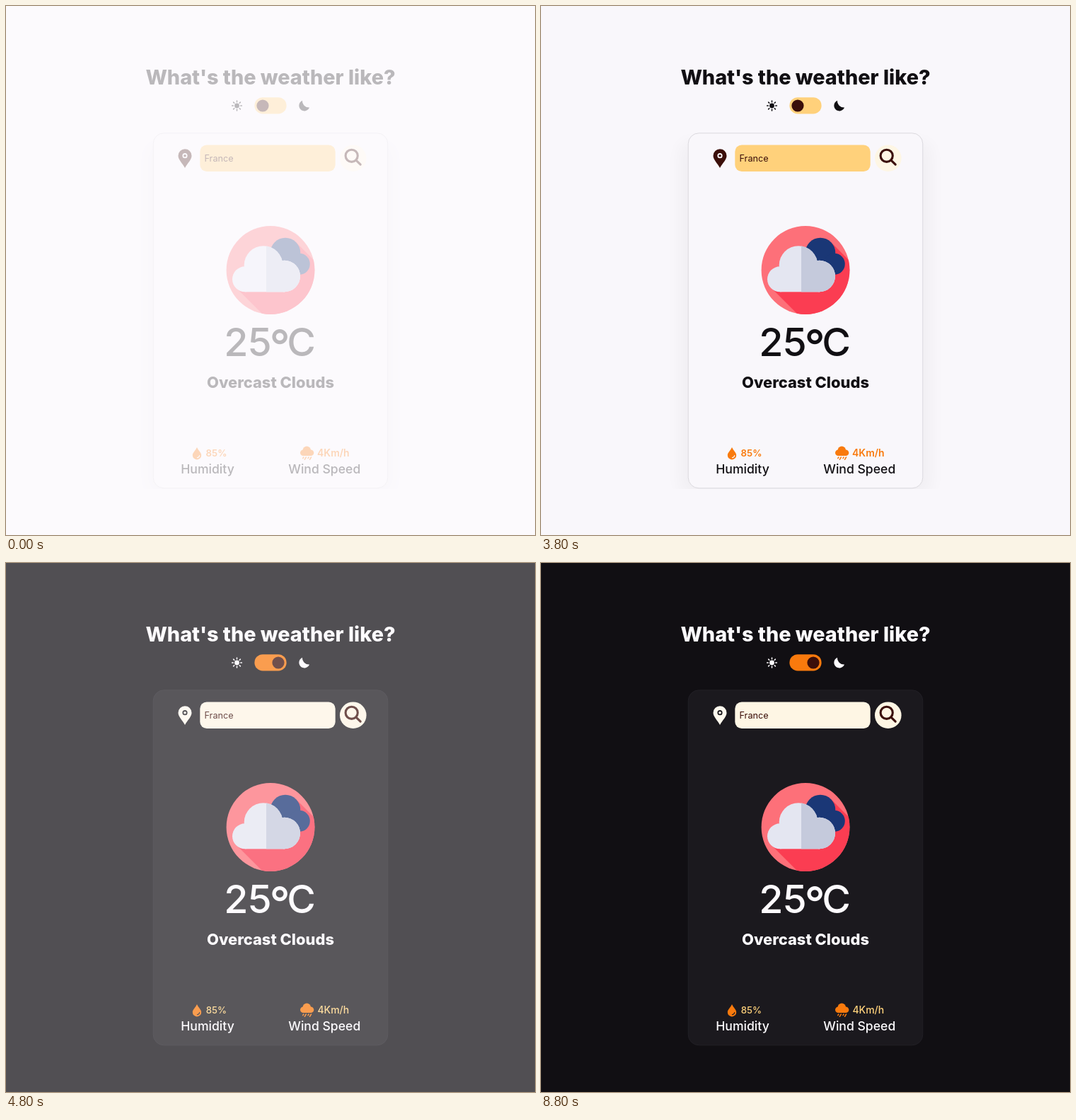
Animation, 748 px wide and 748 px high, one loop 9600 ms. Source, as an HTML page:

```html
<!DOCTYPE html>
<html lang="en">
<head>
<meta charset="utf-8">
<title>Weather card</title>
<style>
  html, body { margin: 0; width: 100%; height: 100%; overflow: hidden; background: #fefcff; }
  svg {
    --bg: #f9f7fb; --card: #f9f7fb; --edge: #dbd9de; --ink: #110f13;
    --pin: #3b0f0a; --field: #ffd17b; --track: #ffd17b; --value: #f97a0d;
    --shade: .03; --knob: 363px; --value-weight: 600;
    display: block; width: 100vw; height: 100vh; background: var(--bg);
    font-family: Inter, "Open Sans", sans-serif;
  }
  svg.dark {
    --bg: #110f13; --card: #1b191e; --edge: #222026; --ink: #fdfbfe;
    --pin: #fef9ee; --field: #fef6e4; --track: #f97a0d; --value: #ffd27b;
    --shade: 0; --knob: 385px; --value-weight: 500;
  }
  text { fill: var(--ink); text-anchor: middle; }
  .bold { font-weight: 800; }
  .temp { font-size: 55.5px; font-weight: 450; }
  .label { font-size: 17.6px; font-weight: 500; }
  .value { fill: var(--value); font-weight: var(--value-weight); }
  .place { fill: #3b0f0a; font-size: 12.7px; text-anchor: start; }
  .ink { fill: var(--ink); stroke: var(--ink); }
  .brown { fill: #3b0f0a; }
  .orange { fill: #f97a0d; stroke: #f97a0d; }
  .knob { cx: var(--knob); }
  .card { fill: var(--card); stroke: var(--edge); }
  .shadow { opacity: var(--shade); filter: blur(11px); }
  .plain { stroke: none; }
</style>
</head>
<body>
<svg id="scene" viewBox="0 0 748 748">
  <defs>
    <clipPath id="aboveFoot"><rect width="748" height="683"/></clipPath>
    <clipPath id="disc"><circle cx="374" cy="373.5" r="62.4"/></clipPath>
    <clipPath id="rightHalf"><rect x="368" y="330" width="60" height="80"/></clipPath>
    <g id="cloud">
      <circle cx="364" cy="366.5" r="27.3"/>
      <circle cx="338" cy="386.3" r="18"/>
      <circle cx="393.7" cy="382" r="22.3"/>
      <rect x="338" y="372" width="56" height="32.3"/>
    </g>
    <path id="ray" d="M0-5.2V-6.9"/>
  </defs>

  <text class="bold" x="374" y="111" font-size="28.8">What's the weather like?</text>

  <g id="sun" class="ink" transform="translate(326.5 141)" stroke-width="1.5" stroke-linecap="round">
    <circle class="plain" r="3.4"/>
  </g>
  <rect x="351.4" y="129.2" width="45.2" height="23.3" rx="11.6" fill="var(--track)"/>
  <circle class="knob brown" cy="141" r="8.6"/>
  <path fill="var(--ink)" d="M419 133.8A7.6 7.6 0 1 0 429 143.6A9.5 9.5 0 0 1 419 133.8Z"/>

  <g clip-path="url(#aboveFoot)">
    <rect class="shadow" x="196" y="192" width="356" height="500" rx="15"/>
  </g>
  <rect class="card" x="208.2" y="179.8" width="331.6" height="502" rx="15"/>

  <path fill="var(--pin)" d="M253 229C250 223 243.5 217.5 243.5 211.8A9.5 9.5 0 0 1 262.5 211.8C262.5 217.5 256 223 253 229Z"/>
  <circle cx="253" cy="211.7" r="2.7" fill="none" stroke="var(--card)" stroke-width="1.8"/>
  <rect x="274.3" y="196.5" width="191.4" height="37.5" rx="9.5" fill="var(--field)"/>
  <text class="place" x="280.5" y="220.3">France</text>
  <circle cx="490.8" cy="215.2" r="18.8" fill="#fef6e4"/>
  <g fill="none" stroke="#3b0f0a" stroke-width="3.1" stroke-linecap="round">
    <circle cx="488.7" cy="211.8" r="8.6"/>
    <path d="M495 218.2L501.2 224.2"/>
  </g>

  <g clip-path="url(#disc)">
    <rect x="311" y="310" width="126" height="127" fill="#fd7079"/>
    <path fill="#fb3d52" d="M325 398L366 439H440V364L410 334Z"/>
  </g>
  <g fill="#1a3776">
    <circle cx="395" cy="349" r="21.3"/>
    <circle cx="414.8" cy="364.8" r="15"/>
  </g>
  <use href="#cloud" fill="#e4e6f1"/>
  <use href="#cloud" fill="#c5cadc" clip-path="url(#rightHalf)"/>

  <text class="temp" x="342" y="495">25</text>
  <text x="387" y="504" font-size="64" font-weight="450">°</text>
  <text class="temp" x="417.5" y="495">C</text>
  <text class="bold" x="374" y="539.5" font-size="21.9">Overcast Clouds</text>

  <path fill="#f97a0d" d="M270 624C268 628.5 263.8 631.5 263.8 635.2A6.2 6.2 0 0 0 276.2 635.2C276.2 631.5 272 628.5 270 624Z"/>
  <path d="M273.7 635.5A3.7 3.7 0 0 1 270.5 638.7" fill="none" stroke="var(--card)" stroke-width="1.2" stroke-linecap="round"/>
  <text class="value" x="297.5" y="637" font-size="13.2">85%</text>
  <text class="label" x="285" y="661">Humidity</text>

  <g class="orange" stroke-width="1.5" stroke-linecap="round">
    <g class="plain">
      <circle cx="425.3" cy="628.3" r="5.8"/>
      <circle cx="420.3" cy="631.7" r="4.3"/>
      <circle cx="431" cy="631.7" r="4.3"/>
      <rect x="420" y="630" width="11" height="6"/>
    </g>
    <path d="M420.8 638L419.8 639.7M424.3 638L422.3 641.3M428 638L427 639.7M431.5 638L429.5 641.3"/>
  </g>
  <text class="value" x="462.8" y="637" font-size="14">4Km/h</text>
  <text class="label" x="450.3" y="661">Wind Speed</text>
</svg>

<script>
  const LOOP = 9600, STEP = 200, FADE = 385;
  const LIGHT_IN = -108, LIGHT_OUT = 4454, DARK_IN = 4520;
  const scene = document.getElementById("scene");
  const sun = document.getElementById("sun");
  const clamp = v => Math.max(0, Math.min(1, v));

  for (let angle = 0; angle < 360; angle += 45) {
    const ray = document.createElementNS(scene.namespaceURI, "use");
    ray.setAttribute("href", "#ray");
    ray.setAttribute("transform", `rotate(${angle})`);
    sun.append(ray);
  }

  function draw(now) {
    const time = Math.floor((now % LOOP) / STEP) * STEP;
    const dark = time >= DARK_IN;
    const fadeIn = (time - (dark ? DARK_IN : LIGHT_IN)) / FADE;
    const fadeOut = dark ? 1 : (LIGHT_OUT - time) / FADE;
    scene.classList.toggle("dark", dark);
    scene.style.opacity = clamp(Math.min(fadeIn, fadeOut));
  }

  const start = performance.now();
  function tick() {
    draw(performance.now() - start);
    requestAnimationFrame(tick);
  }
  tick();
</script>
</body>
</html>
```
